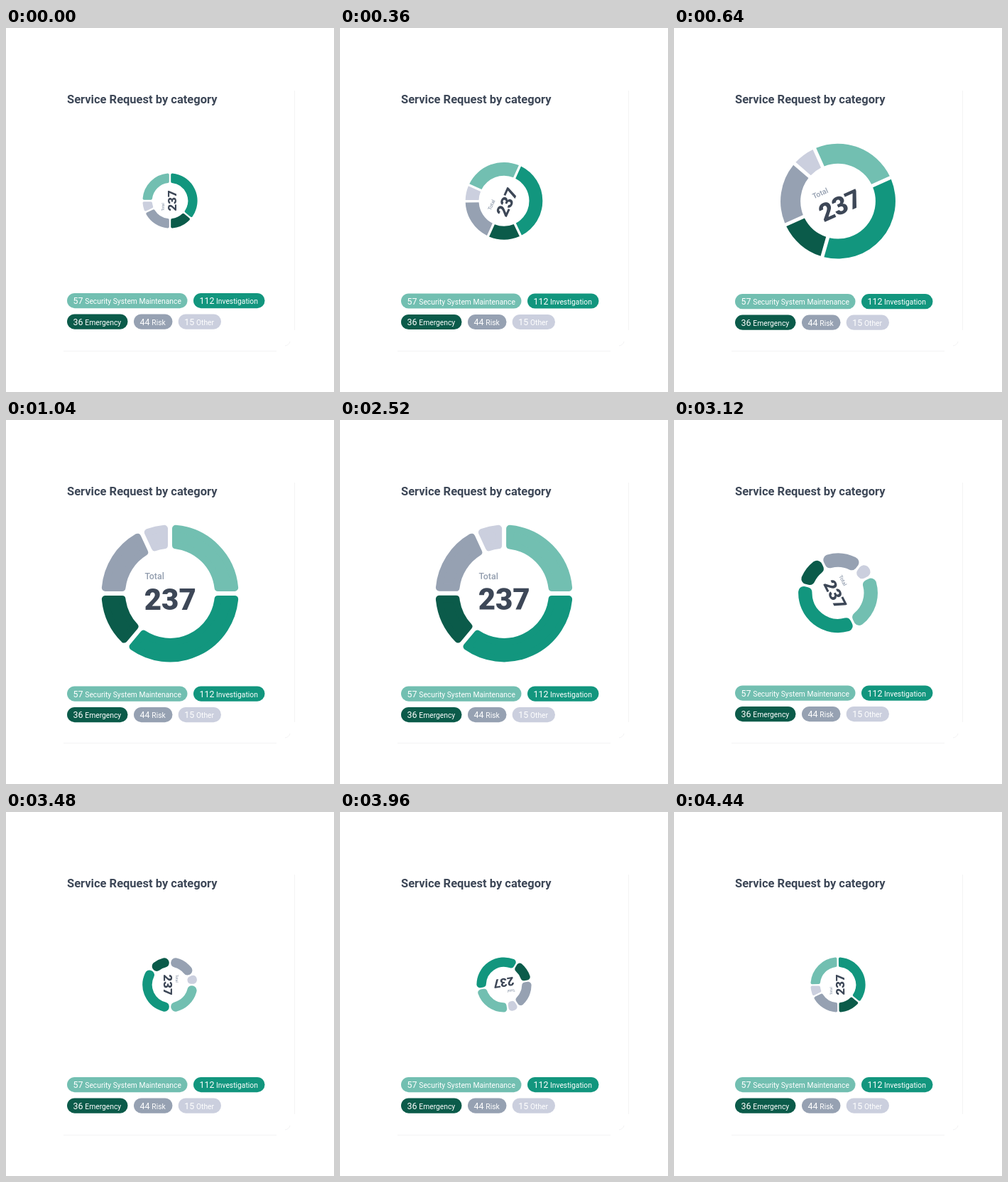
An HTML page for the animation above (4.48 s loop, 462x512 px).

```html
<!DOCTYPE html>
<html lang="en">
<head>
<meta charset="utf-8">
<title>Service Request by category</title>
<style>
  html, body { margin: 0; width: 100%; height: 100%; overflow: hidden; background: #fff; }
  svg { display: block; width: 462px; height: 512px; font-family: Roboto, sans-serif; }
  .title { font-size: 16.5px; font-weight: 700; fill: #3d4757; }
  .total { font-size: 12.4px; font-weight: 500; fill: #929dae; }
  .sum { font-size: 42px; font-weight: 800; fill: #3d4757; }
  .card { fill: none; stroke: #f3f3f4; }
  #legend text { font-size: 10.3px; fill: #fff; }
  #legend .count { font-size: 12.4px; }
  #ring path { stroke-linejoin: round; }
</style>
</head>
<body>
<svg viewBox="0 0 462 512">
  <path class="card" d="M406.5 88V425M81 454.5H381M400 441Q399 446 393 447"/>
  <text class="title" x="86" y="105.5">Service Request by category</text>
  <g id="donut">
    <g id="ring"></g>
    <text class="total" x="-35.5" y="-20">Total</text>
    <text class="sum" x="-36.3" y="22.6">237</text>
  </g>
  <g id="legend"></g>
</svg>
<script>
const LOOP = 4480, OUTER = 96.5, INNER = 63, HALF_GAP = 3;
const SMALL = 0.4, CORNER = 5, ROUND = (OUTER - INNER) / 2;

// from/to: sector angles clockwise from 12 o'clock; x, y, w: legend pill
const categories = [
  { name: 'Security System Maintenance', count: 57, color: '#72bfb1', from: 0, to: 90, x: 86, y: 373, w: 169.5 },
  { name: 'Investigation', count: 112, color: '#12967e', from: 90, to: 220, x: 264, y: 373, w: 100.5 },
  { name: 'Emergency', count: 36, color: '#0b5b4a', from: 220, to: 270, x: 86, y: 402.5, w: 85.5 },
  { name: 'Risk', count: 44, color: '#96a1b2', from: 270, to: 335, x: 180, y: 402.5, w: 54.5 },
  { name: 'Other', count: 15, color: '#cbcfde', from: 335, to: 360, x: 242.7, y: 402.5, w: 60.3 }
];

const donut = document.getElementById('donut');
const ring = document.getElementById('ring');
const legend = document.getElementById('legend');

function add(parent, tag, attrs, text = '') {
  const node = document.createElementNS('http://www.w3.org/2000/svg', tag);
  for (const key in attrs) node.setAttribute(key, attrs[key]);
  node.textContent = text;
  return parent.appendChild(node);
}

for (const c of categories) {
  c.path = add(ring, 'path', { fill: c.color, stroke: c.color });
  add(legend, 'rect', { x: c.x, y: c.y, width: c.w, height: 21.2, rx: 10.6, fill: c.color });
  const labelX = c.x + (c.count > 99 ? 32 : 25.3);
  add(legend, 'text', { class: 'count', x: c.x + 8.5, y: c.y + 15.3 }, c.count);
  add(legend, 'text', { x: labelX, y: c.y + 15.3 }, c.name);
}

const rad = deg => deg * Math.PI / 180;
const lerp = (a, b, k) => a + (b - a) * k;

// cubic-bezier(.42, 0, .58, 1)
function easeInOut(x) {
  x = Math.min(1, Math.max(0, x));
  let lo = 0, hi = 1;
  for (let i = 0; i < 24; i++) {
    const s = (lo + hi) / 2, r = 1 - s;
    if (1.26 * s * r * r + 1.74 * s * s * r + s * s * s < x) lo = s; else hi = s;
  }
  return lo * lo * (3 - 2 * lo);
}

// A sector inset by the corner radius; its round-joined stroke restores the size.
function drawSector({ from, to, path }, corner) {
  const half = Math.sin(Math.min(Math.PI / 2, rad(to - from) / 2));
  const limit = half < 1 ? (INNER * half - HALF_GAP) / (1 - half) : ROUND;
  const c = Math.min(corner, ROUND - 0.01, limit - 0.01);
  const outer = OUTER - c, inner = INNER + c;
  const point = (radius, angle, side) => {
    const a = rad(angle) + side * Math.asin((HALF_GAP + c) / radius);
    return `${(radius * Math.sin(a)).toFixed(3)} ${(-radius * Math.cos(a)).toFixed(3)}`;
  };
  path.setAttribute('d',
    `M${point(outer, from, 1)}A${outer} ${outer} 0 0 1 ${point(outer, to, -1)}` +
    `L${point(inner, to, -1)}A${inner} ${inner} 0 0 0 ${point(inner, from, 1)}Z`);
  path.setAttribute('stroke-width', 2 * c);
}

function poseAt(t) {
  if (t < 2500) {
    const k = easeInOut(t / 1000);
    return { angle: lerp(-90, 0, k), size: k, corner: t >= 20 && t < 1020 ? 0 : CORNER };
  }
  if (t < 3500) {
    const k = easeInOut((t - 2500) / 1000);
    return { angle: lerp(0, 90, k), size: 1 - k, corner: lerp(CORNER, ROUND, k) };
  }
  const k = easeInOut((t - 3500) / 980);
  return { angle: lerp(90, 270, k), size: 0, corner: lerp(ROUND, CORNER, k) };
}

const start = performance.now();
function render() {
  const { angle, size, corner } = poseAt((performance.now() - start) % LOOP);
  donut.setAttribute('transform',
    `translate(231 ${243 + 0.9 * size}) rotate(${angle}) scale(${lerp(SMALL, 1, size)})`);
  legend.setAttribute('transform', `translate(0 ${1.5 * size})`);
  for (const c of categories) drawSector(c, corner);
  requestAnimationFrame(render);
}
render();
</script>
</body>
</html>
```
